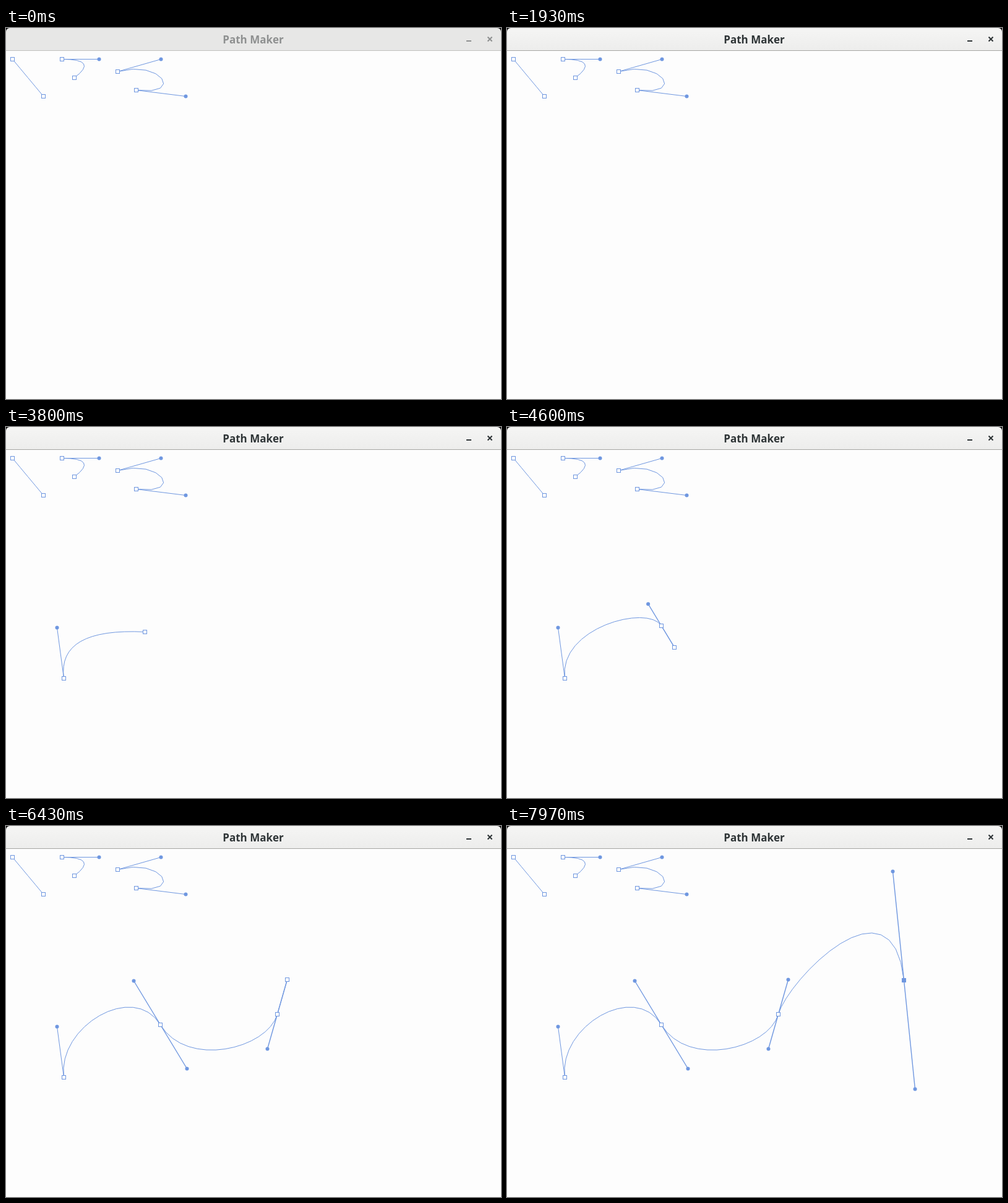
Recreate the animation shown at these times as an HTML page with a canvas. Size 800 px wide and 600 px high, loop 8 s.

```html
<!DOCTYPE html>
<html lang="en">
<head>
<meta charset="utf-8">
<title>Path Maker</title>
<style>
  html, body { margin: 0; width: 100%; height: 100%; overflow: hidden; background: #fdfdfd; }
  canvas { display: block; }
</style>
</head>
<body>
<canvas id="stage" width="800" height="600"></canvas>
<script>
const ctx = document.getElementById('stage').getContext('2d');
const LOOP = 8000, FOCUS = 1400;
const PAPER = '#fdfdfd', INK = '#6f97e0';
const REACH = 0.6; // share of each gesture spent moving; the rest is a pause
const BOW = 0.125; // sag of the pointer's way, relative to its length

// Each anchor is pressed at p and its handle is pulled to h until release
const anchors = [
  { press: 2900, release: 3420, p: [93, 406], h: [82, 324] },
  { press: 4260, release: 5400, p: [249, 321], h: [292, 392] },
  { press: 5950, release: 6500, p: [438, 304], h: [454, 248] },
  { press: 7250, release: 7800, p: [641, 249], h: [659, 425] }
];
const FINISH = anchors[anchors.length - 1].release;

const clamp = k => Math.min(1, Math.max(0, k));
const smooth = k => k * k * (3 - 2 * k);
const lerp = (a, b, k) => a.map((v, i) => v + (b[i] - v) * k);
const gesture = (t, from, to) => smooth(clamp((t - from) / (to - from) / REACH));
const mirror = (p, h) => lerp(h, p, 2);
const gray = (a, b, k) => `rgb(${lerp(a, b, k).map(Math.round).join(',')})`;

// Pull the handle while pressed, then travel to the next anchor
function pointerAt(t, anchor, next) {
  if (t < anchor.release || !next) {
    return lerp(anchor.p, anchor.h, gesture(t, anchor.press, anchor.release));
  }
  const k = gesture(t, anchor.release, next.press);
  const [x, y] = lerp(anchor.h, next.p, k);
  const way = Math.hypot(next.p[0] - anchor.h[0], next.p[1] - anchor.h[1]);
  return [x, y + BOW * way * Math.sin(Math.PI * k)];
}

function polyline(points, width = 1) {
  ctx.beginPath();
  points.forEach(([x, y]) => ctx.lineTo(x + 0.5, y + 0.5));
  ctx.strokeStyle = INK;
  ctx.lineWidth = width;
  ctx.stroke();
}

// Bezier of any degree, drawn as n straight pieces
function curve(controls, n = 16) {
  const pointAt = (row, k) =>
    row.length === 1 ? row[0] : pointAt(row.slice(1).map((q, i) => lerp(row[i], q, k)), k);
  polyline(Array.from({ length: n + 1 }, (_, i) => pointAt(controls, i / n)));
}

function square([x, y], filled) {
  const box = [Math.round(x) - 2.5, Math.round(y) - 2.5, 6, 6];
  ctx.fillStyle = filled ? INK : PAPER;
  ctx.fillRect(...box);
  ctx.strokeStyle = INK;
  ctx.lineWidth = 1;
  ctx.strokeRect(...box);
}

function handle(p, h, width) {
  polyline([p, h], width);
  ctx.beginPath();
  ctx.arc(h[0] + 0.5, h[1] + 0.5, 3, 0, Math.PI * 2);
  ctx.fillStyle = INK;
  ctx.fill();
}

// A line, a quadratic and a cubic, each with its handles
function sample(start, end, c1, c2) {
  curve([start, c1, c2, end].filter(Boolean), 8);
  if (c1) handle(start, c1);
  if (c2) handle(end, c2);
  square(start);
  square(end);
}

function path(t) {
  const placed = anchors.filter(a => t >= a.press);
  if (!placed.length) return;
  const done = t >= FINISH;
  const last = placed[placed.length - 1];
  const mouse = pointerAt(t, last, anchors[placed.length]);
  const nodes = placed.map(a => {
    const h = t < a.release ? mouse : a.h;
    return { ...a, h, back: mirror(a.p, h) };
  });

  nodes.forEach((n, i) => {
    const width = i ? 1.4 : 1;
    if (i) curve([nodes[i - 1].p, nodes[i - 1].h, n.back, n.p]);
    if (i || t < n.release) handle(n.p, n.back, width);
    handle(n.p, n.h, width);
  });
  if (!done) curve([last.p, nodes[nodes.length - 1].h, mouse]);
  placed.forEach(a => square(a.p, done && a === last));
  if (!done) square(mouse);
}

function titleBar(k) {
  ctx.fillStyle = '#101010';
  ctx.fillRect(0, 0, 800, 8);
  const fill = ctx.createLinearGradient(0, 0, 0, 36);
  fill.addColorStop(0, gray([231, 231, 230], [245, 245, 244], k));
  fill.addColorStop(1, gray([231, 231, 230], [237, 237, 236], k));
  ctx.fillStyle = fill;
  ctx.beginPath();
  ctx.roundRect(0, 0, 800, 36, [6, 6, 0, 0]);
  ctx.fill();
  ctx.fillStyle = gray([192, 192, 189], [166, 166, 163], k);
  ctx.fillRect(0, 36, 800, 1);

  ctx.fillStyle = ctx.strokeStyle = gray([142, 144, 144], [46, 52, 54], k);
  ctx.font = '700 17px "Noto Sans", sans-serif';
  ctx.textAlign = 'center';
  ctx.fillText('Path Maker', 399.5, 25);
  ctx.fillRect(744, 20, 8, 2);
  ctx.lineWidth = 2;
  ctx.beginPath();
  for (const side of [-3.5, 3.5]) {
    ctx.moveTo(782 + side, 14.5);
    ctx.lineTo(782 - side, 21.5);
  }
  ctx.stroke();
}

function draw(t) {
  ctx.fillStyle = PAPER;
  ctx.fillRect(0, 0, 800, 600);
  titleBar(smooth(clamp((t - FOCUS) / 200)));
  sample([10, 50], [60, 110]);
  sample([90, 50], [110, 80], [150, 50]);
  sample([180, 70], [210, 100], [250, 50], [290, 110]);
  path(t);
}

const start = performance.now();
function tick() {
  draw((performance.now() - start) % LOOP);
  requestAnimationFrame(tick);
}
tick();
</script>
</body>
</html>
```
